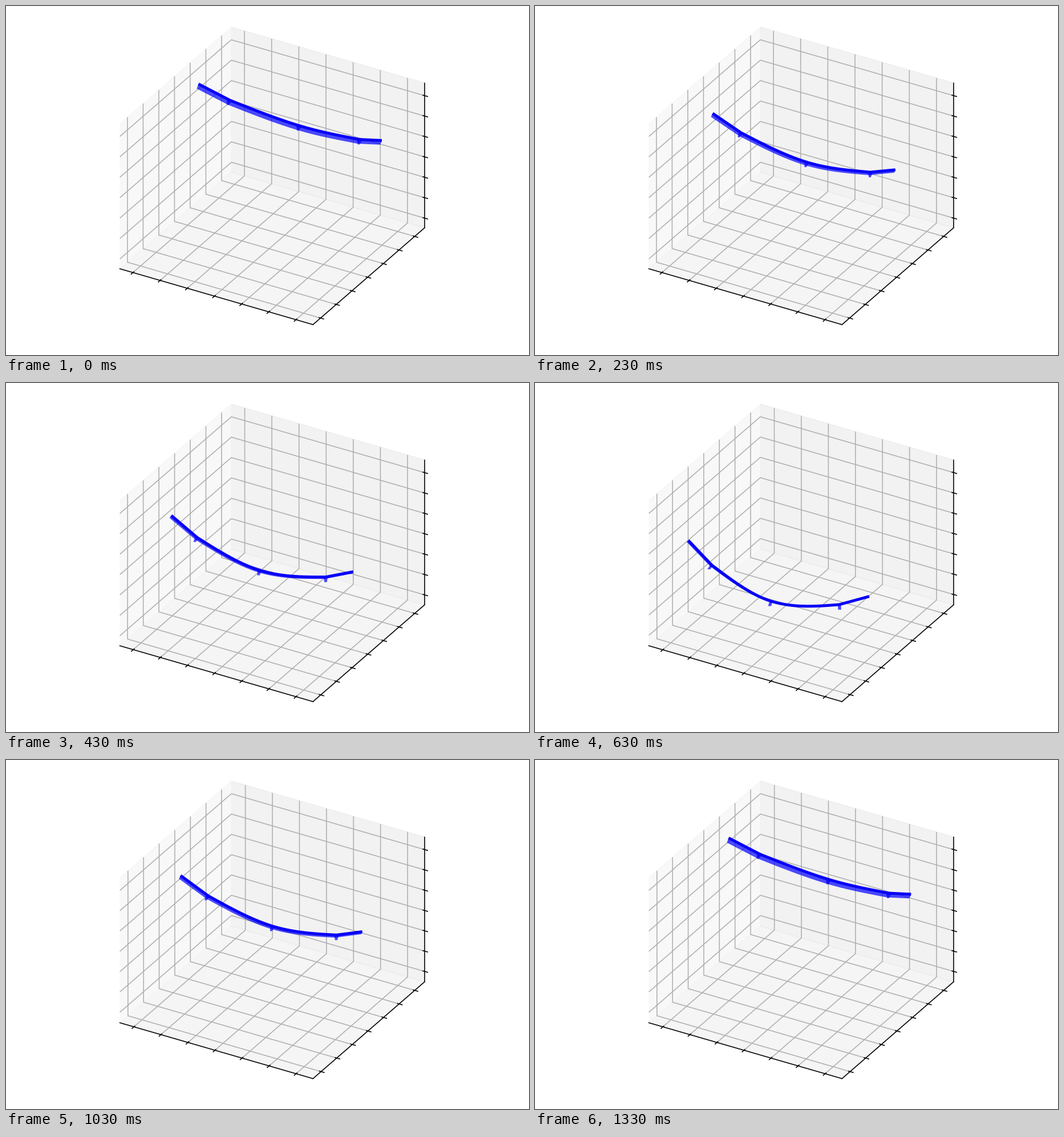
Animation of 917x611 px, one loop 1360 ms. Source, as a matplotlib script:

```python
import numpy as np
import matplotlib.pyplot as plt
from matplotlib.animation import FuncAnimation

W, H, DPI = 917, 611, 100
TICK_MS, LOOP_MS = 10, 1360
TURN = 20                         # step at which the beam starts back up
PX = 72 / DPI                     # one pixel in points

# Highest and lowest pose, in pixels
TIPS = np.array([[(337.5, 136.5), (659, 235.5)],
                 [(263, 283.5), (581.5, 382)]])
DEPTH = np.array([[(-3, 8.2), (-3, 7.3)],
                  [(-3, 2.3), (0, 0.8)]])
SAG = np.array([(0, 12, 19.4, 10.6, 0),
                (0, 33, 66.7, 33, 0)])
STATIONS = np.array([0, 0.195, 0.589, 0.9, 1])   # tip, three ribs, tip
SAG_DIR = np.array([-0.65, 0.76])
CORNER = np.array([734, 135])     # upper limits of all three axes

plt.rcParams.update({"axes.linewidth": 1.6 * PX, "grid.linewidth": 1.6 * PX,
                     "xtick.major.width": 1.6 * PX,
                     "ytick.major.width": 1.6 * PX})

fig = plt.figure(figsize=(W / DPI, H / DPI), dpi=DPI)
pad = 1.7 / H
box = fig.add_axes((pad, pad, 1 - 2 * pad, 1 - 2 * pad),
                   projection="3d", proj_type="ortho")
box.set(xlim=(0, 1), ylim=(0, 1), zlim=(0, 1))
axes3 = (box.xaxis, box.yaxis, box.zaxis)
for axis in axes3:
    axis.set_major_formatter("")

flat = fig.add_axes((0, 0, 1, 1), xlim=(0, W), ylim=(H, 0))
flat.axis("off")


def add_face():
    return flat.fill([0, 1, 1], [0, 0, 1], color="blue", alpha=0.7, lw=0)[0]


web = add_face()
ribs = [add_face() for _ in range(3)]
beam, = flat.plot([], [], color="#0800f5", lw=5 * PX, solid_capstyle="butt",
                  solid_joinstyle="round")


def mix(a, b, t):
    return a + (b - a) * t


def hermite(p, q, m, n):
    """Cubic from p to q with end slopes m and n."""
    t = np.linspace(0, 1, 16)
    dx, dy = q - p
    y = (mix(p[1], q[1], t) + t * (1 - t) ** 2 * (m * dx - dy)
         - t ** 2 * (1 - t) * (n * dx - dy))
    return np.column_stack([mix(p[0], q[0], t), y])


def slope(p, q):
    return (q[1] - p[1]) / (q[0] - p[0])


def spline(a, b, c):
    """Smooth curve through three points, without bending at its ends."""
    mid = slope(a, c)
    first, last = (1.5 * slope(p, b) - 0.5 * mid for p in (a, c))
    return np.vstack([hermite(a, b, first, mid), hermite(b, c, mid, last)])


def draw(frame):
    step = (3 * frame + 1) // 10
    t = 1 - abs(TURN - step) / TURN
    # The axis limits widen once while the beam is low, then stay
    zoom = 1 - 0.005 * np.clip(step / 10 - 1, 0, 1)

    for axis in axes3:
        axis.set_ticks(1 - zoom * (0.088 + 0.1407 * np.arange(7)))

    left, right = mix(*TIPS, t)
    nodes = (mix(left, right, STATIONS[:, None])
             + mix(*SAG, t)[:, None] * SAG_DIR)
    nodes = CORNER + zoom * (nodes - CORNER)
    curve = np.vstack([nodes[0], spline(*nodes[1:4]), nodes[4]])
    beam.set_data(*curve.T)

    # The lower face folds up behind the top line as the beam sinks
    x = curve[:, :1]
    along = (x - x[0]) / (x[-1] - x[0])
    lower = curve + mix(*mix(*DEPTH, t), along)
    web.set_xy(np.vstack([curve, lower[::-1]]))

    # Ribs hang square to the beam, tapered when it is high
    top, tip = mix(5.5, 2.7, t), mix(1.3, 2.7, t)
    for rib, before, node, after in zip(ribs, nodes, nodes[1:], nodes[2:]):
        dx, dy = (after - before) / np.hypot(*(after - before))
        end = node + 9 * np.array([-dy, dx])
        side = np.array([1, 0])
        rib.set_xy([node - top * side, node + top * side,
                    end + tip * side, end - tip * side])
    return [web, beam, *ribs]


anim = FuncAnimation(fig, draw, frames=LOOP_MS // TICK_MS, interval=TICK_MS,
                     init_func=lambda: [], repeat=True, repeat_delay=0,
                     blit=False)
plt.show()
```
